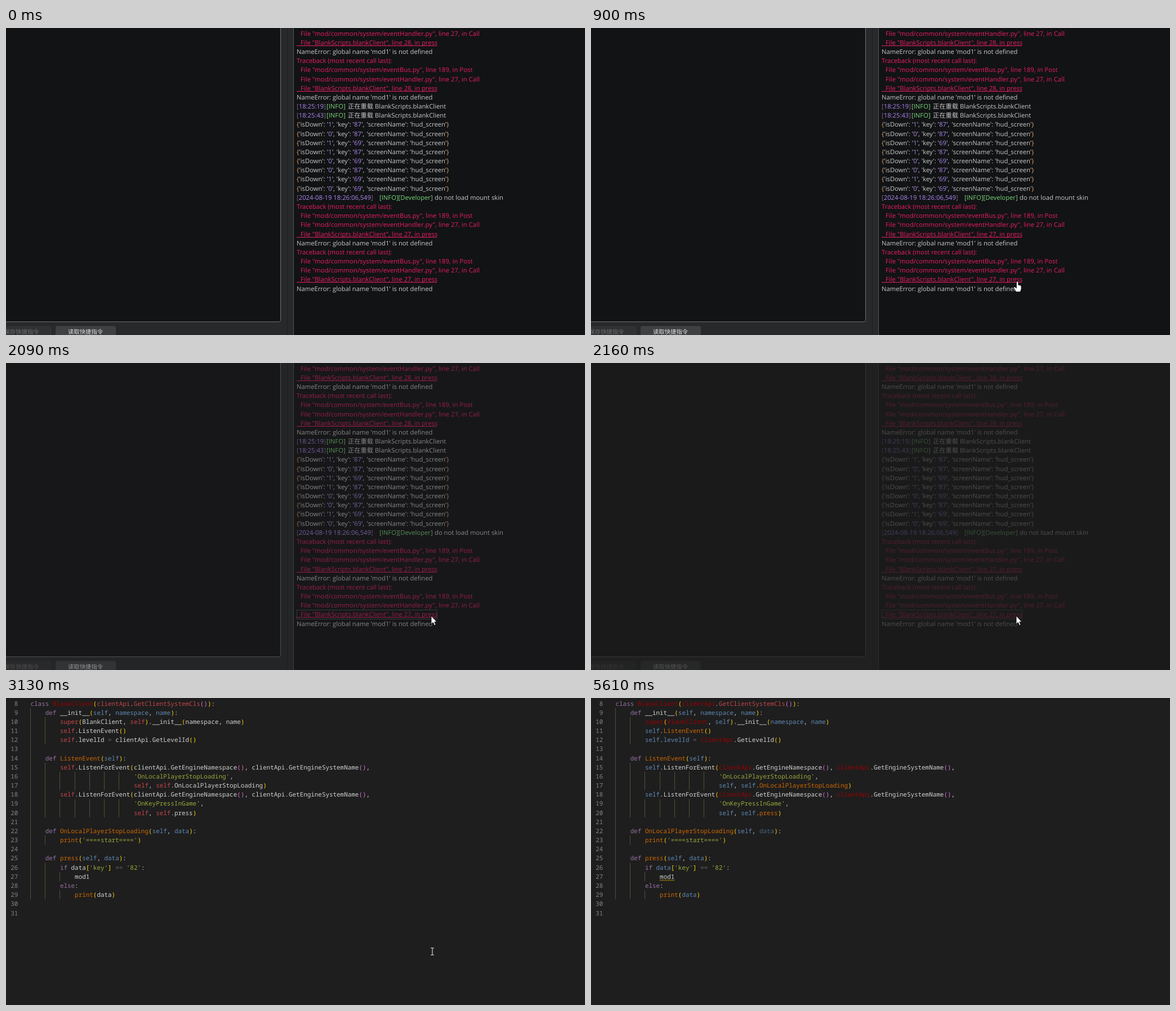
These frames come from a looping animation (1028x545 px, 7 s). An HTML page:

```html
<!DOCTYPE html>
<html lang="zh-CN">
<head>
<meta charset="utf-8">
<style>
  html, body { margin: 0; width: 100%; height: 100%; overflow: hidden; background: #1e1e1e; }
  svg { display: block; width: 1028px; height: 545px; }
  text { white-space: pre; text-rendering: geometricPrecision; }
  #log text { font: 11.25px "Open Sans", "Noto Sans CJK SC", "Noto Sans CJK", sans-serif; }
  #log text.path { letter-spacing: .06px; }
  #panel text { font: 10.35px "Noto Sans CJK SC", "Noto Sans CJK", sans-serif; }
  #code text { font: 10.917px "Noto Sans Mono", monospace; }
</style>
</head>
<body>
<svg viewBox="0 0 1028 545">
  <g id="console">
    <rect width="1028" height="545" fill="#28292b"/>
    <g id="panel">
      <rect x="-10.5" y="-10.5" width="498" height="532" rx="3" fill="#121315" stroke="#707173"/>
      <rect x="-20" y="529" width="101" height="26" rx="4" fill="#303133"/>
      <rect x="88" y="529" width="107" height="26" rx="4" fill="#3e4042"/>
      <text x="-3.5" y="543" fill="#6b6c6e">保存快捷指令</text>
      <text x="110" y="543" fill="#e4e4e4">读取快捷指令</text>
      <rect x="499" width="1" height="545" fill="#1c1d1f"/>
      <rect x="510" width="518" height="545" fill="#121315"/>
      <rect x="510" width="1" height="545" fill="#55565a"/>
    </g>
    <g id="log"></g>
    <rect id="focus" x="516.5" y="438.5" width="249" height="16" fill="none" stroke="#858585" stroke-dasharray="1 1"/>
  </g>
  <rect id="veil" width="1028" height="545" fill="#1e1e1e"/>
  <g id="code">
    <g id="innerGuides" fill="#505037"></g>
    <g id="outerGuide" fill="#505037"></g>
    <path id="squiggle" d="M122 324.5l2 -2 2 2 2 -2 2 2 2 -2 2 2 2 -2 2 2 2 -2 2 2 2 -2 2 2 2 -2" fill="none" stroke="#cca700"/>
  </g>
  <g id="arrow" fill="#fff" stroke="#000" stroke-width=".8">
    <path d="M0 0V14.6L3.3 11.6 5.6 16.8 8 15.8 5.7 10.7H10Z"/>
  </g>
  <g id="hand" fill="#fff" stroke="#000" stroke-width=".7">
    <path d="M-1.6 1.3Q0 -1.3 1.6 1.3V6L5.6 7Q7 7.6 7 9.5V13Q6 15.5 5.4 18.3H-2.4Q-4 14.5 -6.6 11.3Q-6.4 8.7 -3.7 10.2L-1.6 12Z"/>
  </g>
  <g id="beam" fill="none" stroke="#e0e0e0" stroke-width="1.1">
    <path d="M-3 -6.2H-1L0 -5.5 1 -6.2H3M0 -5.5V5.5M-3 6.2H-1L0 5.5 1 6.2H3"/>
  </g>
</svg>
<script>
const LOOP = 7000;
const $ = id => document.getElementById(id);

function add(parent, tag, attrs, content = '') {
  const el = document.createElementNS('http://www.w3.org/2000/svg', tag);
  for (const key in attrs) el.setAttribute(key, attrs[key]);
  el.textContent = content;
  parent.append(el);
  return el;
}

// Console log
const RED = '#e91e63', GREY = '#c8c8c8', PURPLE = '#ae87f0', GREEN = '#79d678', ORANGE = '#e8a05c', DIM = '#75657f';
let logRow = 0;

// Runs are [text, colour, optional x]; a run without x follows the one before it.
function logLine(runs, cls = '') {
  const y = Math.round(13.6 + 16.18 * logRow++);
  const line = add($('log'), 'text', { x: 516, y, class: cls });
  for (const [content, fill, x] of runs) add(line, 'tspan', x ? { fill, x } : { fill }, content);
  return y;
}
const pathLine = (file, rest) => logLine([[`File "mod/common/system/${file}.py", line ${rest}`, RED, 523]], 'path');
const handlerLine = () => pathLine('eventHandler', '27, in Call');

function linkAndError(line) {
  const y = logLine([[`File "BlankScripts.blankClient", line ${line}, in press`, RED, 523]]);
  add($('log'), 'rect', { x: 516, y: y + 1, width: 249, height: 1, fill: RED });
  logLine([["NameError: global name 'mod1' is not defined", GREY]]);
}
function traceback(line) {
  logLine([['Traceback (most recent call last):', RED]]);
  pathLine('eventBus', '189, in Post');
  handlerLine();
  linkAndError(line);
}
function reload(time) {
  logLine([['[', DIM], [time, PURPLE], [']', DIM], ['[INFO]', GREEN, 569],
    ['正在重载', GREY, 607], ['BlankScripts.blankClient', GREY, 655]]);
}
function keyEvent(down, key) {
  logLine([['{', ORANGE], ["'isDown': '", GREY], [down, PURPLE], ["', 'key': '", GREY], [key, PURPLE],
    ["', ", GREY], ["'screenName': 'hud_screen'", GREY, 640.5], ['}', ORANGE]]);
}

handlerLine();
linkAndError(28);
traceback(28);
reload('18:25:19');
reload('18:25:43');
for (const [down, key] of [[1, 87], [0, 87], [1, 69], [1, 87], [0, 69], [0, 87], [1, 69], [0, 69]]) keyEvent(down, key);
logLine([['[', DIM], ['2024-08-19 18:26:06,549', PURPLE], [']', DIM],
  ['[INFO][Developer]', GREEN, 663], ['do not load mount skin', GREY, 761]]);
traceback(27);
traceback(27);

// Code editor
const CHAR = 6.55, LEFT = 43.5, FIRST = 8, PITCH = 16.17;
const TEXT = '#d0d3d1', KEYWORD = '#9872a2', STRING = '#9aa83a', FUNC = '#ce6700', PARAM = '#6089b4',
  SELF = '#c7444a', TYPE = '#9b0000', OPERATOR = '#676867';
const BRACKETS = ['#ffd700', '#da70d6', '#179fff'];
const source = `class BlankClient(clientApi.GetClientSystemCls()):
    def __init__(self, namespace, name):
        super(BlankClient, self).__init__(namespace, name)
        self.ListenEvent()
        self.levelId = clientApi.GetLevelId()

    def ListenEvent(self):
        self.ListenForEvent(clientApi.GetEngineNamespace(), clientApi.GetEngineSystemName(),
                            'OnLocalPlayerStopLoading',
                            self, self.OnLocalPlayerStopLoading)
        self.ListenForEvent(clientApi.GetEngineNamespace(), clientApi.GetEngineSystemName(),
                            'OnKeyPressInGame',
                            self, self.press)

    def OnLocalPlayerStopLoading(self, data):
        print('====start====')

    def press(self, data):
        if data['key'] == '82':
            mod1
        else:
            print(data)

`.split('\n');

const syntax = { class: KEYWORD, def: KEYWORD, if: KEYWORD, else: KEYWORD, self: SELF, super: SELF, print: FUNC, '=': OPERATOR, '==': OPERATOR };
const semantic = { self: PARAM, namespace: PARAM, name: PARAM, data: PARAM, levelId: PARAM, clientApi: TYPE,
  BlankClient: TYPE, super: TYPE, ListenEvent: FUNC, OnLocalPlayerStopLoading: FUNC, press: FUNC };

function syntaxColor(word, line, col) {
  if (syntax[word] && !(word === 'self' && /^ *def/.test(line))) return syntax[word];
  if (word[0] === "'") return STRING;
  if (!/\w/.test(word)) return TEXT;
  if (line.startsWith('class')) return word === 'BlankClient' ? TYPE : SELF;
  if (/^ *def/.test(line)) return col > 8 ? PARAM : word === '__init__' ? TEXT : FUNC;
  return TEXT;
}

const tokens = [];
let depth = 0;
source.forEach((line, row) => {
  const y = Math.round(13.6 + row * PITCH), number = row + FIRST;
  add($('code'), 'text', { x: 21.3, y, 'text-anchor': 'end', fill: '#858585' }, number);
  for (const match of line.matchAll(/'[^']*'|\w+|[()[\]]|[^\w'()[\]\s]/g)) {
    let word = match[0];
    const col = match.index;
    if (word === '=' && line[col - 1] === '=') continue;
    if (word === '=' && line[col + 1] === '=') word = '==';
    const el = add($('code'), 'text', { x: LEFT + col * CHAR, y }, word);
    let colors;
    if (/^[()[\]]$/.test(word)) {
      const level = '(['.includes(word) ? depth++ : --depth;
      colors = [TEXT, TEXT, BRACKETS[level % 3], BRACKETS[level % 3]];
    } else {
      const base = syntaxColor(word, line, col);
      const unused = word === 'data' && line.includes('def OnLocal');
      const defined = word === 'data' || base !== FUNC;
      colors = [TEXT, base, base, unused ? '#4a657e' : defined && semantic[word] || base];
    }
    tokens.push({ el, colors });
  }
});

function guide(parent, col, from, to) {
  add(parent, 'rect', { x: Math.round(LEFT + col * CHAR - .5), y: 1.7 + (from - FIRST) * PITCH, width: 1, height: (to - from + 1) * PITCH });
}
guide($('outerGuide'), 0, 9, 29);
for (const [from, to] of [[10, 12], [15, 20], [23, 23], [26, 29]]) guide($('innerGuides'), 4, from, to);
for (const row of [27, 29]) guide($('innerGuides'), 8, row, row);
for (let col = 8; col <= 24; col += 4) for (const row of [16, 19]) guide($('innerGuides'), col, row, row + 1);

// Animation
const show = (id, on) => $(id).setAttribute('visibility', on ? 'visible' : 'hidden');
const step = (t, start, length, last) => Math.min(last, Math.floor((t - start) / length));

function pointer(t) {
  if (t < 200) return [];
  if (t < 1490) {
    const k = step(t, 200, 70, 10), p = 1 - (1 - k / 10) ** 2;
    return [k > 8 ? 'hand' : 'arrow', 957 - 200 * p, 540 - 90 * p];
  }
  if (t < 2500) {
    const k = step(t, 1490, 100, 4);
    return [k < 2 ? 'hand' : 'arrow', [761, 765, 762, 758, 755][k], [451, 453, 452, 450, 449][k]];
  }
  if (t < 4740) return ['beam', 757, 450];
  if (t >= 5280) return [];
  const p = step(t, 4712, 68, 8) / 8;
  const e = p * p * (3 - 2 * p);
  return ['beam', 759 + 229 * e, 453 + 93 * e];
}

let lastStage = -1;
function draw(t) {
  const [kind, x, y] = pointer(t);
  for (const id of ['arrow', 'hand', 'beam']) show(id, id === kind);
  if (kind) $(kind).setAttribute('transform', `translate(${Math.round(x)} ${Math.round(y)})`);

  show('focus', t >= 1230 && t < 2500);
  $('veil').setAttribute('opacity', t < 2090 ? 0 : [.4, .72, .92, 1][step(t, 2090, 70, 3)]);

  $('code').setAttribute('display', t >= 2500 ? 'inline' : 'none');
  $('innerGuides').setAttribute('display', t >= 2990 ? 'inline' : 'none');
  $('outerGuide').setAttribute('display', t >= 3130 ? 'inline' : 'none');
  $('squiggle').setAttribute('display', t >= 5610 ? 'inline' : 'none');

  const stage = [2590, 2920, 5540].filter(start => t >= start).length;
  if (stage !== lastStage) for (const { el, colors } of tokens) el.setAttribute('fill', colors[stage]);
  lastStage = stage;
}

const began = performance.now();
function tick() {
  draw((performance.now() - began) % LOOP);
  requestAnimationFrame(tick);
}
tick();
</script>
</body>
</html>
```
